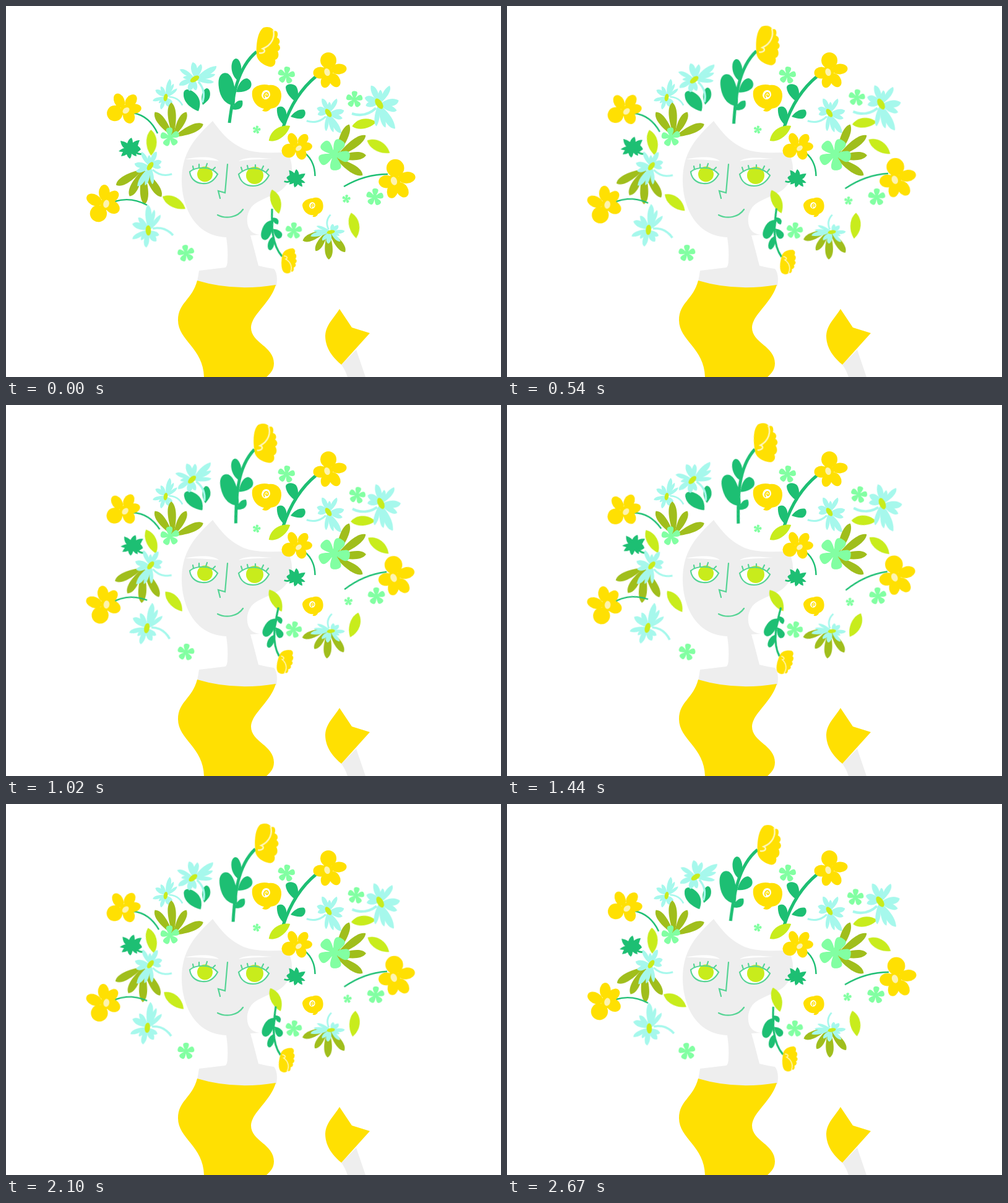
These frames come from a looping animation (800 by 600 pixels, 2.7 s). An HTML page without scripts:

```html
<!DOCTYPE html>
<html lang="en">
<head>
<meta charset="utf-8">
<title>Flower hair</title>
<style>
html, body { margin: 0; width: 100%; height: 100%; overflow: hidden; background: #fff; }
svg { display: block; width: 100%; height: 100%; }
.yellow { fill: #ffe002; }
.skin { fill: #eee; }
.green { fill: #1dbf73; }
.olive { fill: #a0be1c; }
.lime { fill: #c8ec1c; }
.aqua { fill: #a6f8ec; }
.mint { fill: #82ffa2; }
.pale { fill: #fdf3b0; }
.white { fill: #fff; }
.stem, .line { fill: none; stroke: #1dbf73; stroke-width: 2.4; }
.line { stroke: #55d494; stroke-width: 2.2; stroke-linecap: round; }
.aqua-stem { fill: none; stroke: #a6f8ec; stroke-width: 4; }
.curl { fill: none; stroke: #fff6b8; stroke-width: 2.5; }
.sway { animation: sway 1.35s linear infinite alternate; }
@keyframes sway { to { transform: rotate(var(--turn)); } }
</style>
</head>
<body>
<svg viewBox="0 0 800 600">
<defs>
  <path id="leaf" class="lime" d="M-21 0C-10-12 8-12 21 0C8 10-12 10-21 0Z"/>
  <path id="blade" class="olive" d="M0 0C16-5 42-12 50 0C42 11 16 6 0 0Z"/>
  <path id="lobe" d="M0 1C-3-5-9-14 0-14C9-14 3-5 0 1Z"/>
  <g id="blossom" class="mint">
    <circle r="4"/>
    <use href="#lobe"/>
    <use href="#lobe" transform="rotate(72)"/>
    <use href="#lobe" transform="rotate(144)"/>
    <use href="#lobe" transform="rotate(216)"/>
    <use href="#lobe" transform="rotate(288)"/>
  </g>
  <g id="flower">
    <g class="yellow">
      <circle r="9.5"/>
      <ellipse cx="2" cy="-19" rx="13" ry="13"/>
      <ellipse cx="19" cy="-5" rx="12.5" ry="8.5" transform="rotate(-5 19 -5)"/>
      <ellipse cx="12" cy="13" rx="8.5" ry="12" transform="rotate(-32 12 13)"/>
      <ellipse cx="-2" cy="14" rx="8" ry="11.5" transform="rotate(15 -2 14)"/>
      <ellipse cx="-11" cy="1" rx="11.5" ry="9.5"/>
    </g>
    <ellipse class="pale" rx="4.5" ry="6.2" transform="rotate(-18)"/>
  </g>
  <path id="petal" d="M0 1C10-4 22-8 32-2C29 7 12 6 0 1Z"/>
  <g id="daisy">
    <g class="aqua">
      <use href="#petal" transform="rotate(249)"/>
      <use href="#petal" transform="rotate(278)scale(.7)"/>
      <use href="#petal" transform="rotate(303)scale(1.05 .9)"/>
      <use href="#petal" transform="rotate(355)scale(1 1.2)"/>
      <use href="#petal" transform="rotate(24)scale(.95)"/>
      <use href="#petal" transform="rotate(60)scale(1.5 1.2)"/>
      <use href="#petal" transform="rotate(77)scale(1.25 .8)"/>
      <use href="#petal" transform="rotate(99)scale(1.15 .8)"/>
      <use href="#petal" transform="rotate(176)scale(.68 .9)"/>
      <use href="#petal" transform="rotate(207)scale(.78 1.1)"/>
    </g>
    <path class="aqua-stem" d="M-5 7Q-22 23-44 16"/>
    <ellipse class="lime" rx="9.5" ry="5" transform="rotate(56)"/>
  </g>
  <g id="rosebud">
    <path class="stem" style="stroke-width:5" d="M361 189C366 150 373 100 405 74"/>
    <path class="green" d="M376 121C366 116 362 100 366 90C370 82 377 83 380 97C381 108 379 116 376 121ZM369 161C355 160 346 148 344 132C341 112 350 106 358 109C368 114 373 138 369 161ZM372 139C375 128 380 118 389 117C398 119 399 131 392 135C386 139 378 140 372 139ZM365 167C368 158 374 151 382 153C384 162 380 170 365 167Z"/>
    <path class="yellow" d="M416 35C425 32 432 36 433 41C438 38 441 44 438 51C444 54 443 60 440 62C445 66 443 72 439 73C442 79 440 86 435 87C437 95 431 100 425 98C415 95 407 89 405 80C404 64 406 42 416 35Z"/>
    <path class="curl" d="M432 39C435 50 430 63 415 69C420 71 419 77 409 76"/>
  </g>
  <g id="rose">
    <path class="yellow" d="M-23-8C-21-17-6-21 4-18C14-20 25-13 24 0C23 12 17 19 7 20C3 25-3 26-7 23L-4 20C-16 18-25 6-23-8Z"/>
    <ellipse class="white" cx="-1" cy="-2.500" rx="6.8" ry="7.6" transform="rotate(25 -1 -2.500)"/>
    <path fill="none" stroke="#ffe002" stroke-width="2" d="M-3 3C-6-2-2-8 2-5C4-2 2 1 0 0Q-2-1 0-3"/>
  </g>
  <g id="ivy">
    <path class="green" d="M182 235Q188 230 191 230Q186 226 185 218Q192 219 196 222Q198 215 203 213Q205 217 205 221Q210 217 216 217Q214 222 213 226Q217 229 218 232Q214 236 210 238Q211 242 211 243Q206 242 203 239Q203 244 200 247Q196 244 195 240Q191 243 186 243Q187 239 189 236Q185 236 182 235Z"/>
    <path class="stem" style="stroke-width:3" d="M206 233Q212 241 221 239"/>
  </g>
</defs>

<!-- figure -->
<path class="skin" d="M334 186C346 202 358 219 384 231C404 239 428 237 455 237C460 246 462 255 462 263C462 280 452 296 436 303C424 309 412 313 402 320C386 332 386 360 400 367Q405 370 410 370L395 371C400 388 404 405 408 420Q424 424 433 425Q440 433 437 453L370 462L309 446L312 428L354 423Q358 422 358 410Q359 395 356 374C305 372 284 325 284 281C284 235 308 211 334 186Z"/>
<path class="yellow" d="M309 444Q368 462 436 451C428 480 396 500 396 520C396 545 433 550 433 578C433 590 425 596 421 600H320C319 553 278 541 278 508C278 480 301 475 309 444Z"/>
<path class="skin" d="M542 580L566 556L581 600H552Q548 588 542 580Z"/>
<path class="yellow" d="M539 490L559 520L588 529L542 580C520 562 516 545 516 533C517 515 530 505 539 490Z"/>
<path class="white" d="M290 248C305 244 335 242 344 251C335 249 310 248 290 248ZM376 251C385 244 405 245 430 247C410 248 390 248 376 251Z"/>
<path class="white" d="M297 268C305 261 330 257 342 272C335 285 325 288 317 287C305 286 298 278 297 268ZM376 272C390 259 412 259 425 274C418 287 408 291 399 291C388 291 379 285 376 272Z"/>
<circle class="lime" cx="321.5" cy="272" r="12.5"/>
<circle class="lime" cx="402" cy="274" r="14"/>
<path class="line" d="M297 268C305 261 330 257 342 272C335 285 325 288 317 287C305 286 298 278 297 268ZM376 272C390 259 412 259 425 274C418 287 408 291 399 291C388 291 379 285 376 272Z"/>
<path class="line" d="M303 264L302 259M312 262V256M323 261L325 255M334 265L338 261M382 267L380 261M391 263L390 258M403 262V257M413 265L416 259M420 269L424 264M358 256L354 302L343 299L346 311M342 338C356 345 374 342 383 329"/>

<!-- still blooms -->
<path class="stem" style="stroke-width:5" d="M448 196C458 165 475 135 502 113"/>
<path class="green" d="M469 155C460 150 452 140 452 131C454 125 464 125 469 130C474 138 472 148 469 155ZM450 193C441 186 437 175 438 165C444 160 451 163 453 172C454 180 453 188 450 193ZM460 179C466 171 474 166 482 168C486 173 483 180 478 182C472 183 466 181 460 179Z"/>
<use href="#flower" transform="translate(519 107)"/>
<use href="#rose" transform="translate(421 146)"/>
<use href="#rose" transform="translate(496 324)rotate(-15)scale(.7)"/>
<use href="#blossom" transform="translate(453 112)rotate(8)"/>
<use href="#blossom" transform="translate(405 200)rotate(12)scale(.46)"/>
<use href="#leaf" transform="translate(442 206)rotate(-35)"/>
<use href="#daisy" transform="translate(258 148)rotate(-135)scale(.64)"/>
<use href="#daisy" transform="translate(521 173)scale(.8)"/>
<g transform="translate(270 212)">
  <use href="#blade" transform="rotate(234)"/>
  <use href="#blade" transform="rotate(267)scale(1.12 1)"/>
  <use href="#blade" transform="rotate(298)scale(.92)"/>
  <use href="#blade" transform="rotate(337)scale(1.06 1)"/>
</g>
<use href="#blossom" transform="translate(265 212)rotate(-5)scale(1.1)"/>
<path class="stem" d="M482 237Q499 250 499.500 275"/>
<use href="#flower" transform="translate(473 230)rotate(250)scale(.87)"/>
<use href="#ivy" transform="translate(469 279)rotate(10)scale(-.87 .87)translate(-200 -230)"/>
<g transform="translate(532 245)">
  <use href="#blade" transform="rotate(293)scale(1.16 1)"/>
  <use href="#blade" transform="rotate(324)scale(1.22 1)"/>
  <use href="#blade" transform="rotate(356)"/>
  <use href="#blade" transform="rotate(33)scale(1.06 1)"/>
</g>
<use href="#blossom" transform="translate(530 240)rotate(28)scale(1.85)"/>

<!-- swaying blooms -->
<g class="sway" style="--turn:-9deg;transform-origin:386px 103px">
  <use href="#rosebud"/>
</g>
<g class="sway" style="--turn:-16deg;transform-origin:315px 140px">
  <path class="green" d="M311 170C299 166 286 155 287 142C287 135 293 133 300 137C309 142 318 153 311 170ZM318 160C314 148 317 136 324 133C331 133 332 147 326 153Q322 157 318 160Z"/>
  <use href="#daisy" transform="translate(305 118)rotate(-88)scale(.85)"/>
</g>
<g class="sway" style="--turn:-11deg;transform-origin:213px 180px">
  <path class="stem" d="M206 173Q232 178 245 206"/>
  <use href="#flower" transform="translate(194 169)rotate(250)scale(.98)"/>
</g>
<g class="sway" style="--turn:12deg;transform-origin:222px 253px">
  <use href="#ivy"/>
</g>
<g class="sway" style="--turn:-30deg;transform-origin:234px 221px">
  <use href="#leaf" transform="translate(234.500 221)rotate(90)"/>
</g>
<g class="sway" style="--turn:7deg;transform-origin:230px 268px">
  <g transform="translate(222 264)">
    <use href="#blade" transform="rotate(150)scale(1.02 1)"/>
    <use href="#blade" transform="rotate(117)scale(.98)"/>
    <use href="#blade" transform="rotate(88)scale(1.14 1)"/>
    <use href="#blade" transform="rotate(57)scale(1.07 1)"/>
  </g>
  <use href="#daisy" transform="translate(233 259)scale(-.8 .8)"/>
</g>
<g class="sway" style="--turn:-10.5deg;transform-origin:182px 318px">
  <path class="stem" d="M176 316Q202 308 228 322"/>
  <use href="#flower" transform="translate(162 320)rotate(213)scale(1.05)"/>
</g>
<g class="sway" style="--turn:28deg;transform-origin:272px 317px">
  <use href="#leaf" transform="translate(271.500 318)rotate(28.400)"/>
</g>
<g class="sway" style="--turn:18.5deg;transform-origin:237px 352px">
  <use href="#daisy" transform="translate(230 363)rotate(-149)scale(.87)"/>
</g>
<g class="sway" style="--turn:20deg;transform-origin:292px 399px">
  <use href="#blossom" transform="translate(291 400)rotate(-8)scale(.98)"/>
</g>
<g class="sway" style="--turn:12deg;transform-origin:597px 177px">
  <use href="#leaf" transform="translate(579 191)rotate(-10)scale(.95)"/>
  <use href="#blossom" transform="translate(563 151)rotate(2)scale(.96)"/>
  <use href="#daisy" transform="translate(603 158)"/>
</g>
<g class="sway" style="--turn:12deg;transform-origin:602px 227px">
  <use href="#leaf" transform="translate(602 227.500)rotate(29)"/>
</g>
<g class="sway" style="--turn:-9deg;transform-origin:598px 286px">
  <path class="stem" d="M617 272Q580 272 546 292"/>
  <use href="#flower" transform="translate(627 283)scale(1.1)"/>
  <use href="#blossom" transform="translate(596 309)rotate(5)"/>
  <use href="#blossom" transform="translate(550 312)rotate(8)scale(.48)"/>
</g>
<g class="sway" style="--turn:39deg;transform-origin:561px 357px">
  <use href="#leaf" transform="translate(562 355)rotate(79)"/>
</g>
<g class="sway" style="--turn:5.8deg;transform-origin:522px 368px">
  <g transform="translate(521 362)">
    <use href="#blade" transform="rotate(157)scale(.9)"/>
    <use href="#blade" transform="rotate(121)scale(.8)"/>
    <use href="#blade" transform="rotate(89)scale(.96)"/>
    <use href="#blade" transform="rotate(53)scale(.9)"/>
  </g>
  <use href="#daisy" transform="translate(525 365.500)scale(.7 .6)rotate(109)"/>
</g>
<g class="sway" style="--turn:16deg;transform-origin:466px 362px">
  <use href="#blossom" transform="translate(465 363.500)rotate(2)scale(.96)"/>
</g>
<g class="sway" style="--turn:-18deg;transform-origin:435px 316px">
  <use href="#leaf" transform="translate(435.500 316.500)rotate(74)scale(.97)"/>
</g>
<g class="sway" style="--turn:14.6deg;transform-origin:438px 381px">
  <use href="#rosebud" transform="translate(430 328)rotate(9)scale(.64 -.64)translate(-361 -189)"/>
</g>
</svg>
</body>
</html>
```
